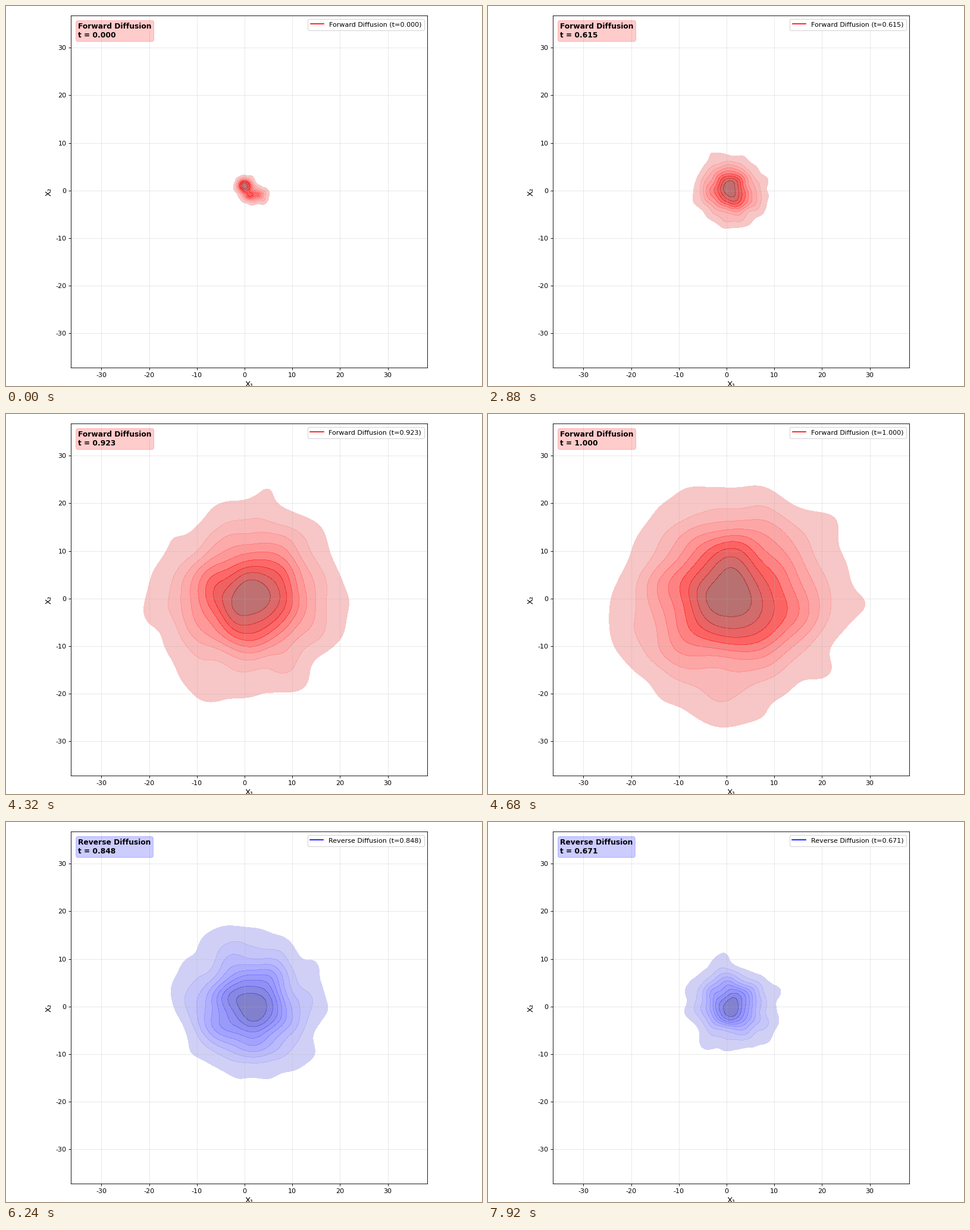
These frames come from a looping animation (800x640 px, 8000 ms). A matplotlib script:

```python
import numpy as np
import matplotlib.pyplot as plt
from matplotlib.animation import FuncAnimation
from matplotlib.colors import ListedColormap
from matplotlib.lines import Line2D

W, H, DPI = 800, 640, 80
PX = 8.02                       # pixels per data unit
X0, Y0 = 401.0, 310.8           # pixel position of the data origin
LEFT, RIGHT, TOP, BOTTOM = 109.3, 708.2, 16.3, 609
TICK, STEP, FRAMES = 40, 120, 200
FORWARD, REVERSE = 40, 80       # steps in each direction
LAST = (FRAMES - 1) * TICK // STEP

SAMPLES, GRID = 1000, 200
SHARES = np.linspace(0.05, 1, 10)
GROWTH = 25.0                   # noise rate is GROWTH ** t

# Two Gaussian clusters: mean and variance along each axis
MEANS = np.array([[0, 1], [2, -0.9]])
VARS = np.array([[0.75, 0.75], [1.9, 0.85]])


def state(step):
    """Direction, colour and diffusion time of a step."""
    if step < FORWARD:
        return "Forward", "red", step / (FORWARD - 1)
    return "Reverse", "blue", 1 - (step - FORWARD) / (REVERSE - 1)


def noise_var(t):
    return (GROWTH ** (2 * t) - 1) / (2 * np.log(GROWTH))


def score(x, t):
    """Gradient of the log density of the diffused clusters."""
    var = VARS + noise_var(t)
    gap = MEANS - x[:, None, :]
    p = np.exp(-(gap ** 2 / var).sum(2) / 2) / np.sqrt(var.prod(1)) + 1e-300
    p /= p.sum(1, keepdims=True)
    return (p[:, :, None] * gap / var).sum(1)


def simulate():
    """Point clouds of all steps: fresh noise forward, then the reverse SDE."""
    rng = np.random.default_rng(4)
    pick = np.arange(SAMPLES) % 2
    normal = lambda: rng.normal(size=(SAMPLES, 2))
    start = MEANS[pick] + np.sqrt(VARS[pick]) * normal()
    clouds = [start + np.sqrt(noise_var(state(s)[2])) * normal()
              for s in range(FORWARD)]
    x = np.sqrt(noise_var(1)) * normal()
    dt = 1 / (REVERSE - 1)
    for s in range(FORWARD, LAST + 1):
        clouds.append(x)
        t = state(s)[2]
        g = GROWTH ** t
        x = x + g ** 2 * score(x, t) * dt + g * np.sqrt(dt) * normal()
    return clouds


CLOUDS = simulate()


def kernels(v):
    """Grid along one axis and the kernel of each sample on it."""
    width = v.std() * SAMPLES ** (-1 / 6)
    grid = np.linspace(v.min() - 3 * width, v.max() + 3 * width, GRID)
    return grid, np.exp(-((grid[:, None] - v) / width) ** 2 / 2)


def density(step):
    """Kernel density and the levels that leave fixed shares of mass outside."""
    gx, kx = kernels(CLOUDS[step][:, 0])
    gy, ky = kernels(CLOUDS[step][:, 1])
    z = ky @ kx.T
    flat = np.sort(z.ravel())[::-1]
    mass = np.cumsum(flat) / flat.sum()
    return gx, gy, z, flat[np.searchsorted(mass, 1 - SHARES)]


def luv_rgb(light, chroma, hue):
    u = chroma * np.cos(hue) / (13 * light) + 0.19784
    v = chroma * np.sin(hue) / (13 * light) + 0.46834
    y = ((light + 16) / 116) ** 3
    xyz = np.array([y * 9 * u / (4 * v), y + 0 * u,
                    y * (12 - 3 * u - 20 * v) / (4 * v)])
    m = np.array([[3.2406, -1.5372, -0.4986],
                  [-0.9689, 1.8758, 0.0415],
                  [0.0557, -0.2040, 1.0570]])
    return m @ xyz


def ramp(hue):
    """Light to dark map of one hue, most saturated in the middle."""
    hue = np.radians(hue)
    chromas = np.linspace(0, 200, 801)
    colors = []
    for light, s in zip(np.linspace(35, 80, 256), np.cos(np.linspace(-1, 1, 294))):
        rgb = luv_rgb(light, chromas, hue)
        ok = ((rgb > -0.001) & (rgb < 1.001)).all(0)
        top = chromas[-1] if ok.all() else chromas[np.argmin(ok)]
        lin = np.clip(luv_rgb(light, np.array([s * top]), hue)[:, 0], 0, 1)
        colors.append(np.where(lin <= 0.0031308, 12.92 * lin,
                               1.055 * lin ** (1 / 2.4) - 0.055))
    return ListedColormap(np.clip(colors[::-1], 0, 1))


CMAPS = {"red": ramp(12.18), "blue": ramp(265.87)}

plt.rcParams["font.family"] = "DejaVu Sans"
plt.rcParams["axes.unicode_minus"] = False
fig = plt.figure(figsize=(W / DPI, H / DPI), dpi=DPI, facecolor="white")
ax = fig.add_axes([LEFT / W, 1 - BOTTOM / H, (RIGHT - LEFT) / W, (BOTTOM - TOP) / H])
ax.set(xticks=range(-30, 31, 10), yticks=range(-30, 31, 10),
       xlim=((LEFT - X0) / PX, (RIGHT - X0) / PX),
       ylim=((Y0 - BOTTOM) / PX, (Y0 - TOP) / PX))
ax.set_autoscale_on(False)
ax.set_xlabel("X₁", fontsize=12)
ax.set_ylabel("X₂", fontsize=12)
ax.grid(True, alpha=0.3)

note = ax.text(0.02, 0.98, "", transform=ax.transAxes, va="top", fontsize=11,
               fontweight="bold",
               bbox=dict(boxstyle="round,pad=0.3", color="red", alpha=0.2))
legend = ax.legend([Line2D([], [], color="red")], ["Forward Diffusion (t=0.000)"],
                   loc="upper right", fontsize=10)
shown = {"step": None, "fill": None}


def draw(step):
    if step == shown["step"]:
        return
    if shown["fill"] is not None:
        shown["fill"].remove()
    name, color, t = state(step)
    x, y, z, levels = density(step)
    shown["fill"] = ax.contourf(x, y, z, levels, cmap=CMAPS[color], alpha=0.7,
                                extend="max")
    shown["step"] = step
    note.set_text(f"{name} Diffusion\nt = {t:.3f}")
    note.get_bbox_patch().set_color(color)
    legend.get_lines()[0].set_color(color)
    legend.get_texts()[0].set_text(f"{name} Diffusion (t={t:.3f})")


def update(frame):
    draw(frame * TICK // STEP)
    return []


def init():
    draw(0)
    return []


anim = FuncAnimation(fig, update, frames=FRAMES, init_func=init, interval=TICK,
                     repeat=True, repeat_delay=0, blit=False)
plt.show()
```
